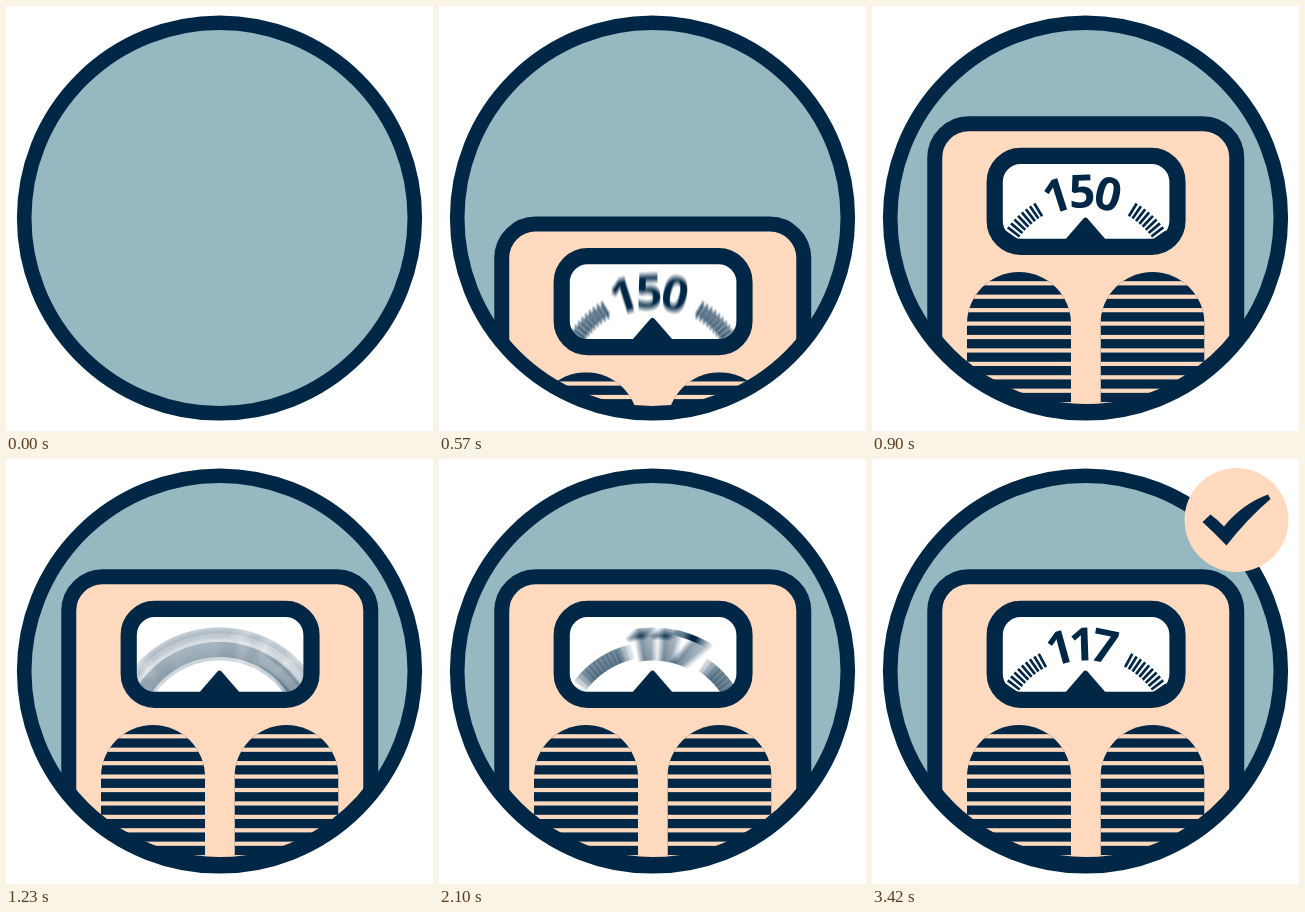
An HTML page with a canvas that plays this animation: 427 px wide and 425 px high, repeating every 4.2 s.

```html
<!DOCTYPE html>
<html lang="en">
<head>
<meta charset="utf-8">
<title>Bathroom scale</title>
<style>
html, body { margin: 0; width: 100%; height: 100%; overflow: hidden; background: #fff; }
canvas { display: block; }
</style>
</head>
<body>
<canvas id="stage" width="427" height="425"></canvas>
<script>
const W = 427, H = 425, LOOP = 4200, STEP = 30, SHUTTER = 15;
const NAVY = '#002846', PEACH = '#ffdabf', BLUE = '#95b8c1';
const CX = 213.5, CY = 212, DIAL_Y = 281;
const ctx = document.getElementById('stage').getContext('2d');
const layer = Object.assign(document.createElement('canvas'), { width: W, height: H });
const ink = layer.getContext('2d');

const rad = deg => deg * Math.PI / 180;

function ease(t, from, to) {
  const s = Math.min(1, Math.max(0, (t - from) / (to - from)));
  return s * s * (3 - 2 * s);
}

const slide = t => 329 * (1 - ease(t, 0, 900));
const spin = t => -(15 * 360 + 270) * ease(t, 900, 2130);
const badgeScale = t => 1.06 * ease(t, 2700, 3000) - 0.06 * ease(t, 3000, 3420);

function rounded(x, y, w, h, r) {
  const p = new Path2D();
  p.roundRect(x, y, w, h, r);
  return p;
}

function arc(x, y, r, from = 0, to = 360) {
  const p = new Path2D();
  p.arc(x, y, r, rad(from), rad(to));
  return p;
}

function fill(path, color) {
  ctx.fillStyle = color;
  ctx.fill(path);
}

function outline(path, width) {
  ctx.strokeStyle = NAVY;
  ctx.lineWidth = width;
  ctx.stroke(path);
}

const body = rounded(62.75, 117.75, 302, 340, 34);
const bodyFoot = arc(CX, CY, 193.5, 37, 143);
const pane = rounded(122.7, 149.8, 182.8, 91, 26);
const pointer = new Path2D('M192 235L211.5 212.5Q213.5 210.5 215.5 212.5L235 235Z');
const check = new Path2D('M330.5 63L338.5 55.5Q346 61 352 67.5Q370 45 396 35.5L398.5 40Q375 60 354.5 86.5Q342.5 74 330.5 63Z');

// Four numbers, a quarter turn apart: text, digit spacing, ticks on each side
const numbers = [['150', 15.6, 5], ['139', 15.6, 5], ['128', 15.6, 5], ['117', 13.5, 6]];
const ticks = new Path2D();
numbers.forEach(([, , count], i) => {
  for (let k = 0; k < count; k++) {
    for (const side of [-1, 1]) {
      const a = rad(i * 90 + side * (43.5 - 3 * k));
      ticks.moveTo(83 * Math.sin(a), -83 * Math.cos(a));
      ticks.lineTo(98 * Math.sin(a), -98 * Math.cos(a));
    }
  }
});

function drawDial(y, angle) {
  ink.save();
  ink.translate(CX, y);
  ink.rotate(rad(angle));
  ink.stroke(ticks);
  numbers.forEach(([text, gap], i) => {
    [...text].forEach((digit, j) => {
      ink.save();
      ink.rotate(rad(i * 90 - 2 + (j - 1) * gap));
      ink.fillText(digit, 0, -79.5);
      ink.restore();
    });
  });
  ink.restore();
}

// Average of the dial over the shutter time gives motion blur
function renderDial(t) {
  const moving = t < 900 || (t > 900 && t < 2130);
  const n = moving ? 51 : 1;
  ink.globalCompositeOperation = 'source-over';
  ink.globalAlpha = 1;
  ink.clearRect(0, 0, W, H);
  ink.globalCompositeOperation = 'lighter';
  ink.globalAlpha = 1 / n;
  ink.fillStyle = ink.strokeStyle = '#000';
  ink.lineWidth = 2.7;
  ink.font = 'bold 46px "Open Sans", sans-serif';
  ink.textAlign = 'center';
  for (let i = 0; i < n; i++) {
    const at = n > 1 ? t + SHUTTER * ((i + 0.5) / n - 0.5) : t;
    drawDial(DIAL_Y + slide(at) - slide(t), spin(at));
  }
  ink.globalCompositeOperation = 'source-in';
  ink.globalAlpha = 1;
  ink.fillStyle = NAVY;
  ink.fillRect(0, 0, W, H);
}

function drawFoot(x) {
  ctx.save();
  ctx.clip(rounded(x, 266, 104, 160, [52, 52, 0, 0]));
  ctx.fillStyle = NAVY;
  ctx.fillRect(x, 266, 104, 160);
  ctx.fillStyle = PEACH;
  for (let y = 275.2; y < 400; y += 13.43) ctx.fillRect(x, y, 104, 4.2);
  ctx.restore();
}

function drawScale(t) {
  ctx.save();
  ctx.clip(arc(CX, CY, 192));
  ctx.translate(0, slide(t));
  fill(body, PEACH);
  drawFoot(95);
  drawFoot(228.5);
  outline(body, 15);
  outline(bodyFoot, 15);
  fill(pane, '#fff');
  ctx.save();
  ctx.clip(pane);
  renderDial(t);
  ctx.drawImage(layer, 0, 0);
  ctx.restore();
  fill(pointer, NAVY);
  outline(pane, 16.2);
  ctx.restore();
}

function drawBadge(t) {
  const s = badgeScale(t);
  if (s <= 0) return;
  ctx.save();
  ctx.translate(364.5, 61);
  ctx.scale(s, s);
  ctx.translate(-364.5, -61);
  fill(arc(364.5, 61, 52), PEACH);
  fill(check, NAVY);
  ctx.restore();
}

function draw(t) {
  ctx.fillStyle = '#fff';
  ctx.fillRect(0, 0, W, H);
  fill(arc(CX, CY, 195), BLUE);
  drawScale(t);
  outline(arc(CX, CY, 195.3), 14.6);
  drawBadge(t);
}

const start = performance.now();
let shown = -1;
function tick() {
  const elapsed = (performance.now() - start) % LOOP;
  const t = Math.floor(elapsed / STEP) * STEP;
  if (t !== shown) draw(shown = t);
  requestAnimationFrame(tick);
}
tick();
</script>
</body>
</html>
```
